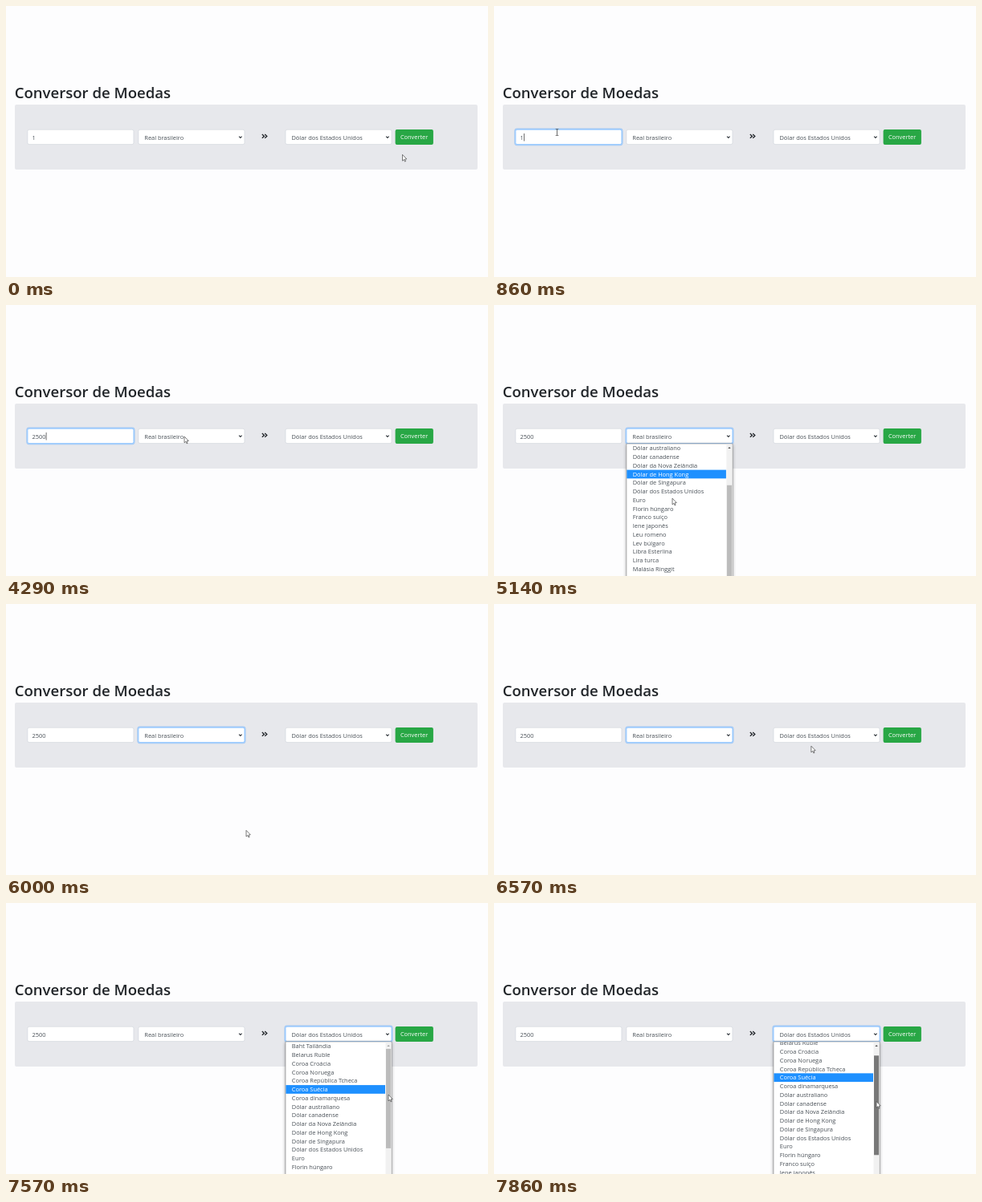
Recreate the animation shown at these times as an HTML page with a canvas. Size 600 by 338 pixels, loop 8 s.

```html
<!DOCTYPE html>
<html lang="pt-BR">
<head>
<meta charset="utf-8">
<title>Conversor de Moedas</title>
<style>
html, body { margin: 0; width: 100%; height: 100%; overflow: hidden; background: #fdfdfe; }
canvas { display: block; width: 600px; height: 338px; }
</style>
</head>
<body>
<canvas id="stage"></canvas>
<script>
const W = 600, H = 338, LOOP = 8000, TICK = 1000 / 7, LAST_TICK = 55;
const FONT = '"Open Sans", "Noto Sans", sans-serif';
const INK = '#495057', DARK = '#212529';
const ROW = 10.74, LIST_TOP = 173.4, LIST_H = 216, LIST_W = 124;
const FIELD_W = 132, AMOUNT_X = 26.9, FROM_X = 164.9, TO_X = 348;
const GRAB_Y = 239.1, THUMB_H = 124, THUMB_RATIO = 0.57;

// Moments of the demo, in screen refreshes (seven per second).
const AT = { focusAmount: 6, clear: 13, type: 17, typed: 23, focusFrom: 32, openFrom: 33,
  closeFrom: 42, openTo: 48, grab: 53 };

const currencies = [
  'Baht Tailândia', 'Belarus Ruble', 'Coroa Croácia', 'Coroa Noruega',
  'Coroa República Tcheca', 'Coroa Suécia', 'Coroa dinamarquesa',
  'Dólar australiano', 'Dólar canadense', 'Dólar da Nova Zelândia',
  'Dólar de Hong Kong', 'Dólar de Singapura', 'Dólar dos Estados Unidos',
  'Euro', 'Florin húngaro', 'Franco suíço', 'Iene japonês', 'Leu romeno',
  'Lev búlgaro', 'Libra Esterlina', 'Lira turca', 'Malásia Ringgit',
  'Novo Shekel Israel'
];

// Each glide eases the pointer to a new resting place.
const glides = [
  { from: 0, to: 6, x: 78.5, y: 157.5 },
  { from: 6, to: 9, x: 96.5, y: 156.3 },
  { from: 24, to: 30, x: 222, y: 164 },
  { from: 33, to: 38, x: 222, y: 283 },
  { from: 41, to: 42, x: 299, y: 282.3 },
  { from: 42, to: 47, x: 406, y: 165 },
  { from: 47, to: 49, x: 403.7, y: 213 },
  { from: 50, to: AT.grab, x: 476, y: GRAB_Y },
  { from: AT.grab, to: LAST_TICK, x: 476, y: 247.5 }
];

const canvas = document.getElementById('stage');
const ctx = canvas.getContext('2d');
const dpr = window.devicePixelRatio || 1;
canvas.width = W * dpr;
canvas.height = H * dpr;
ctx.scale(dpr, dpr);

function ease(k, from, to) {
  const f = Math.min(1, Math.max(0, (k - from) / (to - from)));
  return f * f * (3 - 2 * f);
}

function pointerAt(k) {
  let x = 493.5, y = 185.3;
  for (const g of glides) {
    const f = ease(k, g.from, g.to);
    x += (g.x - x) * f;
    y += (g.y - y) * f;
  }
  return { x, y };
}

function amountAt(k) {
  if (k < AT.clear) return '1';
  return '2500'.slice(0, Math.max(0, Math.floor((k - AT.type) / 2) + 1));
}

function caretVisible(k) {
  const idle = k < AT.clear ? k - AT.focusAmount
    : k < AT.type ? k - AT.clear : Math.max(0, k - AT.typed);
  return Math.floor(idle / 3) % 2 === 0;
}

function focusAt(k) {
  if (k < AT.focusAmount) return '';
  return k < AT.focusFrom ? 'amount' : k < AT.openTo ? 'from' : 'to';
}

function scrollAt(k) {
  if (k < AT.openTo) return 7 * ROW;
  return k > AT.grab ? (pointerAt(k).y - GRAB_Y) / THUMB_RATIO : 0;
}

// The highlight trails the pointer by one refresh and stays on the last row it crossed.
function hoveredRow(k, x, openedAt, selected) {
  for (let i = k - 1; i >= openedAt; i--) {
    const p = pointerAt(i);
    if (p.y > LIST_TOP && p.x > x && p.x < x + LIST_W) {
      return Math.floor((p.y - LIST_TOP + scrollAt(i)) / ROW);
    }
  }
  return selected;
}

function rect(x, y, w, h, fill) {
  ctx.fillStyle = fill;
  ctx.fillRect(x, y, w, h);
}

function box(x, y, w, h, r, fill, stroke, line = 0.6) {
  ctx.beginPath();
  ctx.roundRect(x, y, w, h, r);
  ctx.fillStyle = fill;
  ctx.fill();
  if (!stroke) return;
  ctx.strokeStyle = stroke;
  ctx.lineWidth = line;
  ctx.stroke();
}

function text(str, x, y, color = INK, size = 7.41, weight = 400) {
  ctx.font = `${weight} ${size}px ${FONT}`;
  ctx.fillStyle = color;
  ctx.fillText(str, x, y);
}

function trace(points) {
  ctx.beginPath();
  points.forEach(([x, y]) => ctx.lineTo(x, y));
}

function chevron(x, y, angle, reach, spread, color, line) {
  ctx.save();
  ctx.translate(x, y);
  ctx.rotate(angle);
  trace([[-reach, -spread], [reach, 0], [-reach, spread]]);
  ctx.strokeStyle = color;
  ctx.lineWidth = line;
  ctx.stroke();
  ctx.restore();
}

function field(x, active) {
  if (active) box(x - 0.8, 153.4, FIELD_W + 1.6, 20, 2.6, '#fff', 'rgba(0,123,255,.3)', 1.6);
  box(x, 154.2, FIELD_W, 18.4, 2, '#fff', active ? '#80bdff' : '#ced4da', active ? 0.8 : 0.6);
}

function select(x, label, active) {
  field(x, active);
  text(label, x + 7.4, 166.5);
  chevron(x + 126.9, 163.6, Math.PI / 2, 0.9, 1.8, '#343a40', 1.1);
}

function popup(x, k, openedAt, selected) {
  const scroll = scrollAt(k), hover = hoveredRow(k, x, openedAt, selected);
  const barX = x + LIST_W + 0.5, tip = barX + 3.6;
  ctx.save();
  ctx.shadowColor = 'rgba(0,0,0,.45)';
  ctx.shadowBlur = 4 * dpr;
  ctx.shadowOffsetY = dpr;
  rect(x, 173, FIELD_W, LIST_H, '#fff');
  ctx.restore();
  box(x, 173, FIELD_W, LIST_H, 0, '#fff', '#888');

  ctx.save();
  ctx.beginPath();
  ctx.rect(x + 0.4, LIST_TOP, FIELD_W - 0.8, LIST_H);
  ctx.clip();
  currencies.forEach((name, i) => {
    const y = LIST_TOP + i * ROW - scroll;
    if (i === hover) rect(x, y, LIST_W, ROW, '#1e90ff');
    text(name, x + 7.8, y + 8, i === hover ? '#fff' : INK);
  });
  rect(barX, LIST_TOP, 7.2, LIST_H, '#f1f1f1');
  trace([[tip - 1.7, 179], [tip, 177], [tip + 1.7, 179]]);
  ctx.fillStyle = scroll ? '#505050' : '#a3a3a3';
  ctx.fill();
  rect(barX + 0.5, 181.9 + scroll * THUMB_RATIO, 6.2, THUMB_H, k > AT.grab ? '#787878' : '#bcbcbc');
  ctx.restore();
}

function arrowPointer(x, y) {
  ctx.save();
  ctx.translate(x, y);
  trace([[0, 0], [0, 7.8], [1.8, 6.2], [3, 8.8], [4.1, 8.3], [3, 5.7], [5.3, 5.5]]);
  ctx.closePath();
  ctx.fillStyle = '#fff';
  ctx.fill();
  ctx.lineJoin = 'round';
  ctx.strokeStyle = '#444';
  ctx.lineWidth = 0.7;
  ctx.stroke();
  ctx.restore();
}

function beamPointer(x, y) {
  rect(x - 0.4, y - 4, 0.8, 8, '#444');
  for (const end of [-4.2, 3.5]) rect(x - 1.9, y + end, 3.8, 0.7, '#555');
}

function draw(k) {
  const focus = focusAt(k), amount = amountAt(k), { x, y } = pointerAt(k);
  rect(0, 0, W, H, '#fdfdfe');
  text('Conversor de Moedas', 10.7, 115, DARK, 18.57, 600);
  box(11, 123, 576, 81, 2, '#e7e8ec');

  field(AMOUNT_X, focus === 'amount');
  text(amount, 32.6, 166.5);
  if (focus === 'amount' && caretVisible(k)) {
    rect(32.8 + ctx.measureText(amount).width, 159, 0.7, 9.5, '#333');
  }
  select(FROM_X, 'Real brasileiro', focus === 'from');
  for (const cx of [320.1, 323.5]) chevron(cx, 162.4, 0, 1.3, 2.4, DARK, 1.3);
  select(TO_X, 'Dólar dos Estados Unidos', focus === 'to');
  box(484.6, 153.9, 47.3, 19.2, 2, '#28a745');
  text('Converter', 490.9, 166.4, '#fff');

  if (k >= AT.openTo) popup(TO_X, k, AT.openTo, 12);
  else if (k >= AT.openFrom && k < AT.closeFrom) popup(FROM_X, k, AT.openFrom, 26);

  const overInput = x > AMOUNT_X && x < AMOUNT_X + FIELD_W && y > 153 && y < 173;
  (overInput ? beamPointer : arrowPointer)(x, y);
}

function frame() {
  const t = performance.now() % LOOP;
  draw(Math.min(LAST_TICK, Math.floor((t + 6) / TICK)));
  requestAnimationFrame(frame);
}
frame();
</script>
</body>
</html>
```
